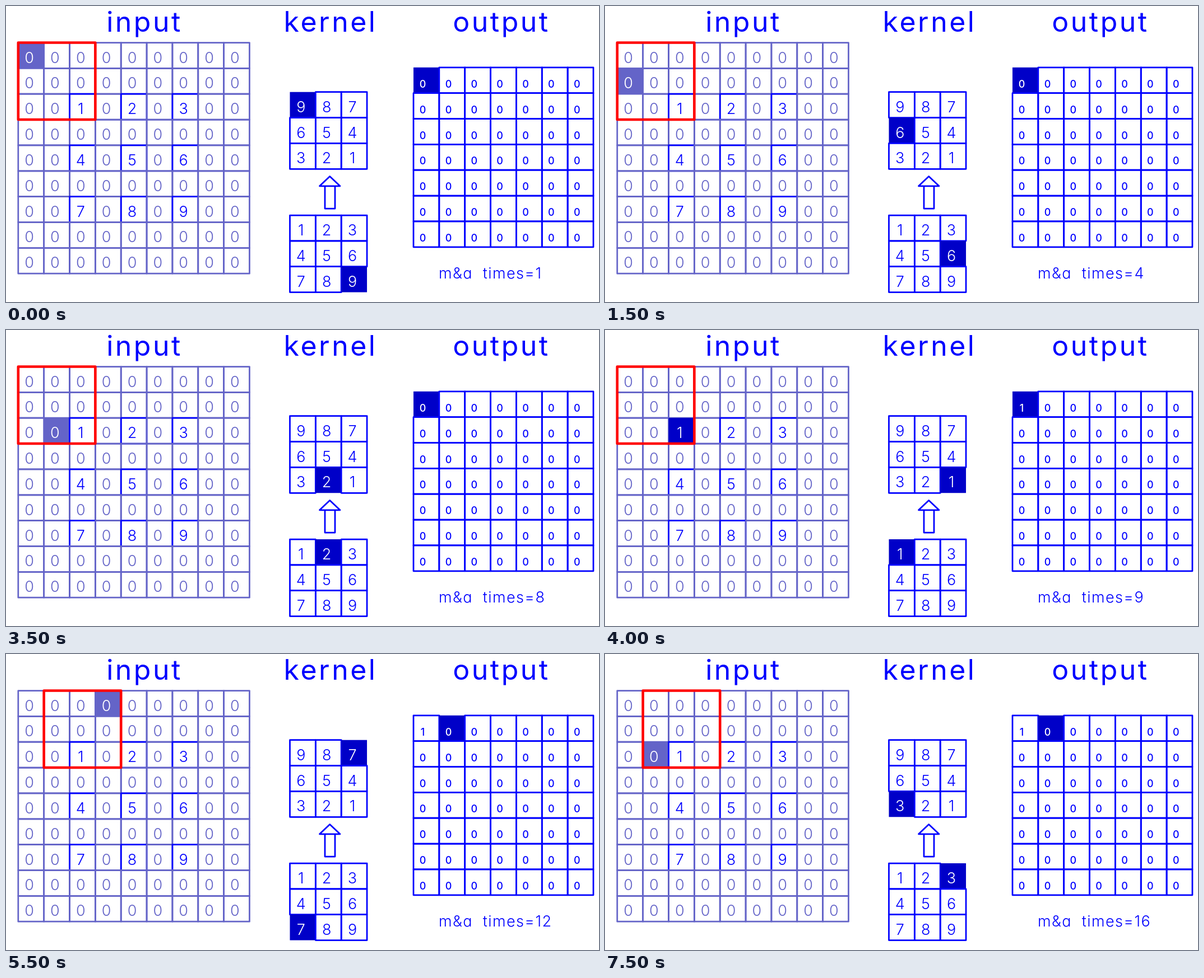
An HTML page that plays this animation: 1058x529 px, repeating every 8000 ms.

```html
<!DOCTYPE html>
<html lang="en">
<head>
<meta charset="utf-8">
<title>Convolution steps</title>
<style>
  html, body { margin: 0; width: 100%; height: 100%; overflow: hidden; background: #fff; }
  svg { display: block; width: 100vw; height: 100vh; }
  text { font-family: Inter, Roboto, sans-serif; text-anchor: middle; fill: #00f; }
  .title { font-size: 50px; letter-spacing: 3.5px; }
  .digit { font-size: 27px; font-weight: 300; }
  .small { font-size: 18px; font-weight: 500; }
  .count { font-size: 27px; letter-spacing: 1.4px; word-spacing: 9px; text-anchor: start;
           font-weight: 300; font-feature-settings: "cv11"; }
  .line { fill: none; stroke: #00f; stroke-width: 2.75; stroke-linejoin: round; }
  .window { fill: none; stroke: #f00; stroke-width: 4.6; stroke-linejoin: round; }
</style>
</head>
<body>
<svg viewBox="0 0 1058 529">
  <text class="title" x="247" y="46">input</text>
  <text class="title" x="579" y="46">kernel</text>
  <text class="title" x="884" y="46">output</text>
  <g id="grids"></g>
  <path class="line" d="M577.7 304.5 L596 321.8 H559.5 Z M569 321.8 H587 V362 H569 Z"/>
  <rect id="window" class="window" y="65.5"/>
  <text id="count" class="count" x="772" y="486.5"></text>
</svg>
<script>
const STEP = 500, LOOP = 8000;
const CELL = 45.85, INPUT_X = 21.8;
const BLUE = { line: '#0000ff', fill: '#0000c8' };
const PALE = { line: '#6464c8', fill: '#6464c8' };
const grids = document.getElementById('grids');
const frame = document.getElementById('window');
const count = document.getElementById('count');

const inputAt = (r, c) =>
  [r, c].every(n => n % 2 === 0 && n >= 2 && n <= 6) ? (r / 2 - 1) * 3 + c / 2 : 0;

// Cells are laid in reading order, so later borders overlap earlier cells.
function grid({ x, y, size, value, active, palette = () => BLUE, type = 'digit', dx = 19.8 }) {
  let markup = '';
  for (let i = 0; i < size * size; i++) {
    const r = Math.floor(i / size), c = i % size;
    const left = x + c * CELL, top = y + r * CELL;
    const { line, fill } = palette(r, c), on = i === active;
    const box = `x="${left}" y="${top}" width="${CELL}" height="${CELL}"`;
    markup += on
      ? `<rect ${box} fill="${fill}"/>`
      : `<rect ${box} class="line" style="stroke:${line}"/>`;
    markup += `<text class="${type}" x="${left + dx}" y="${top + 36}" ` +
      `style="fill:${on ? '#fff' : line}">${value(r, c)}</text>`;
  }
  return markup;
}

// Sum of the products visited so far for one output cell.
function outputAt(r, c, step) {
  const visited = Math.min(9, step + 1 - (r * 7 + c) * 9);
  let sum = 0;
  for (let p = 0; p < visited; p++) {
    sum += inputAt(r + Math.floor(p / 3), c + p % 3) * (9 - p);
  }
  return sum;
}

function draw(step) {
  const tap = step % 9, slot = Math.floor(step / 9);
  const row = Math.floor(slot / 7), col = slot % 7;
  const inputCell = (row + Math.floor(tap / 3)) * 9 + col + tap % 3;
  grids.innerHTML =
    grid({ x: INPUT_X, y: 65.5, size: 9, value: inputAt, active: inputCell,
           palette: (r, c) => inputAt(r, c) ? BLUE : PALE }) +
    grid({ x: 506.5, y: 153.7, size: 3, value: (r, c) => 9 - r * 3 - c, active: tap }) +
    grid({ x: 506.5, y: 374, size: 3, value: (r, c) => 1 + r * 3 + c, active: 8 - tap }) +
    grid({ x: 727, y: 109.8, size: 7, value: (r, c) => outputAt(r, c, step), active: slot,
           type: 'small', dx: 16.6 });
  frame.setAttribute('x', INPUT_X + col * CELL);
  frame.setAttribute('width', 3 * CELL);
  frame.setAttribute('height', 3 * CELL);
  count.textContent = `m&a times=${step + 1}`;
}

const start = performance.now();
let shown = -1;
function tick() {
  const step = Math.floor((performance.now() - start) % LOOP / STEP);
  if (step !== shown) draw(shown = step);
  requestAnimationFrame(tick);
}
tick();
</script>
</body>
</html>
```
